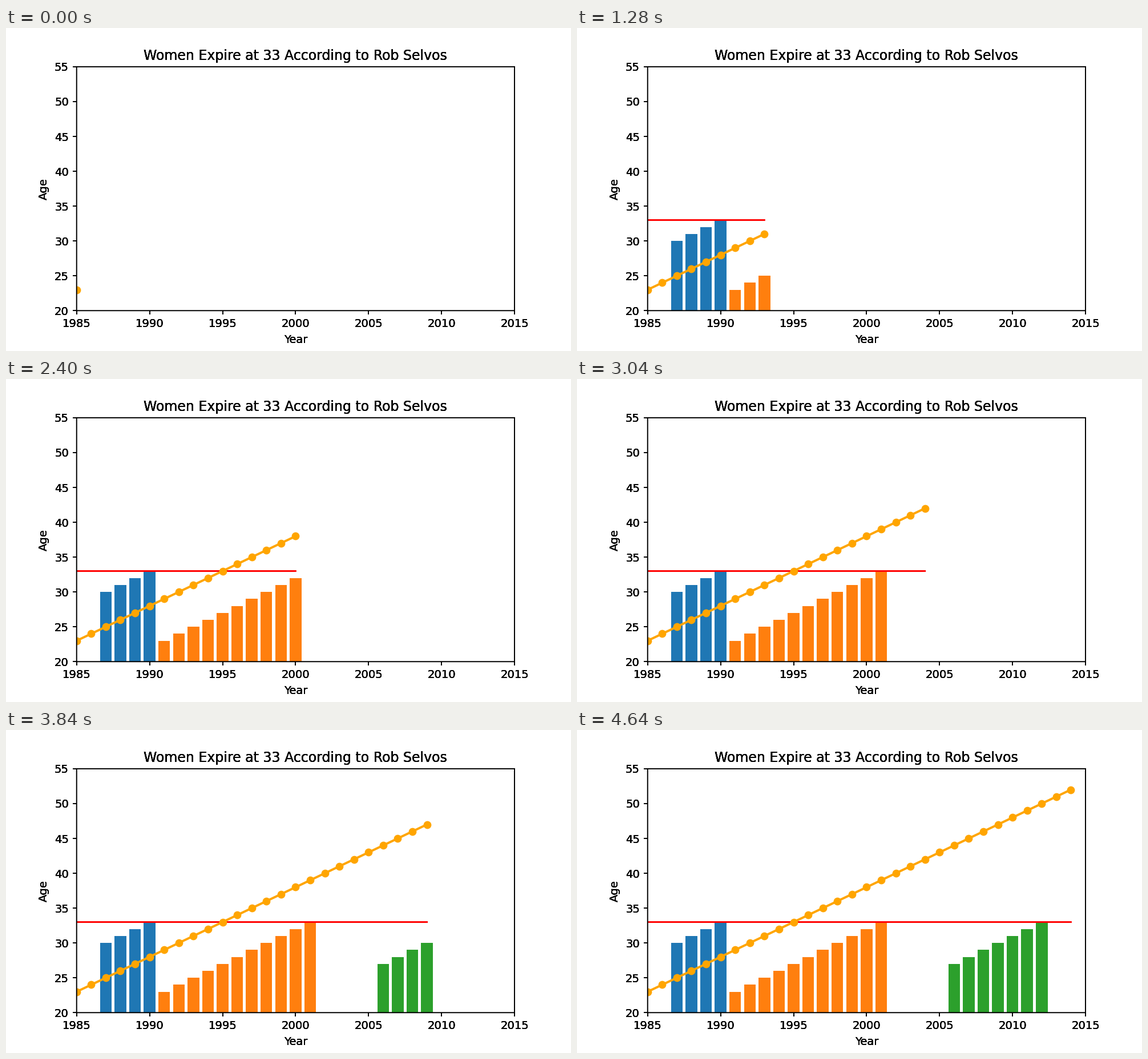
Write a matplotlib script that moves like this. It is 990 px wide and 566 px high and loops after 4.96 s.

```python
import matplotlib.pyplot as plt
from matplotlib.animation import FuncAnimation

DPI = 141.5
START, END = 1985, 2014
START_AGE, LIMIT = 23, 33
STEP_MS = 160
TEXT_LAYERS = 3

# first year, last year, age in the first year, colour
PARTNERS = [
    (1987, 1990, 30, "tab:blue"),
    (1991, 2001, 23, "tab:orange"),
    (2006, 2012, 27, "tab:green"),
]

plt.rcParams.update({
    "font.family": "DejaVu Sans",
    "axes.linewidth": 1,
    "axes.labelpad": 4.5,
    "xtick.major.width": 1,
    "ytick.major.width": 1,
})
fig = plt.figure(figsize=(990.001 / DPI, 566.001 / DPI), dpi=DPI,
                 facecolor="white")


def add_axes():
    ax = fig.add_axes([0.125, 0.125, 0.775, 0.755])
    ax.set(xlim=(1985, 2015), ylim=(20, 55), xlabel="Year", ylabel="Age",
           title="Women Expire at 33 According to Rob Selvos")
    return ax


ax = add_axes()
for spine in ax.spines.values():
    spine.set_snap(False)

# clear layers that hold only the text, to deepen its soft edges
for _ in range(TEXT_LAYERS):
    layer = add_axes()
    layer.patch.set_visible(False)
    layer.spines[:].set_visible(False)
    layer.tick_params(color="none")

bars = []
for first, last, age, color in PARTNERS:
    years = range(first, last + 1)
    ages = [age + y - first for y in years]
    bars += zip(years, ax.bar(years, ages, width=0.8, color=color))

limit_line, = ax.plot([], [], color="red", lw=1.5, snap=False)
age_line, = ax.plot([], [], color="orange", lw=2, marker="o")


def update(i):
    now = min(START + i, END)
    years = list(range(START, now + 1))
    limit_line.set_data(years, [LIMIT] * len(years))
    age_line.set_data(years, [START_AGE + y - START for y in years])
    for year, bar in bars:
        bar.set_visible(year <= now)
    return [limit_line, age_line] + [bar for _, bar in bars]


# the full chart holds for one extra step
anim = FuncAnimation(fig, update, frames=END - START + 2, interval=STEP_MS,
                     init_func=lambda: update(0), repeat=True,
                     repeat_delay=0, blit=False)
plt.show()
```
